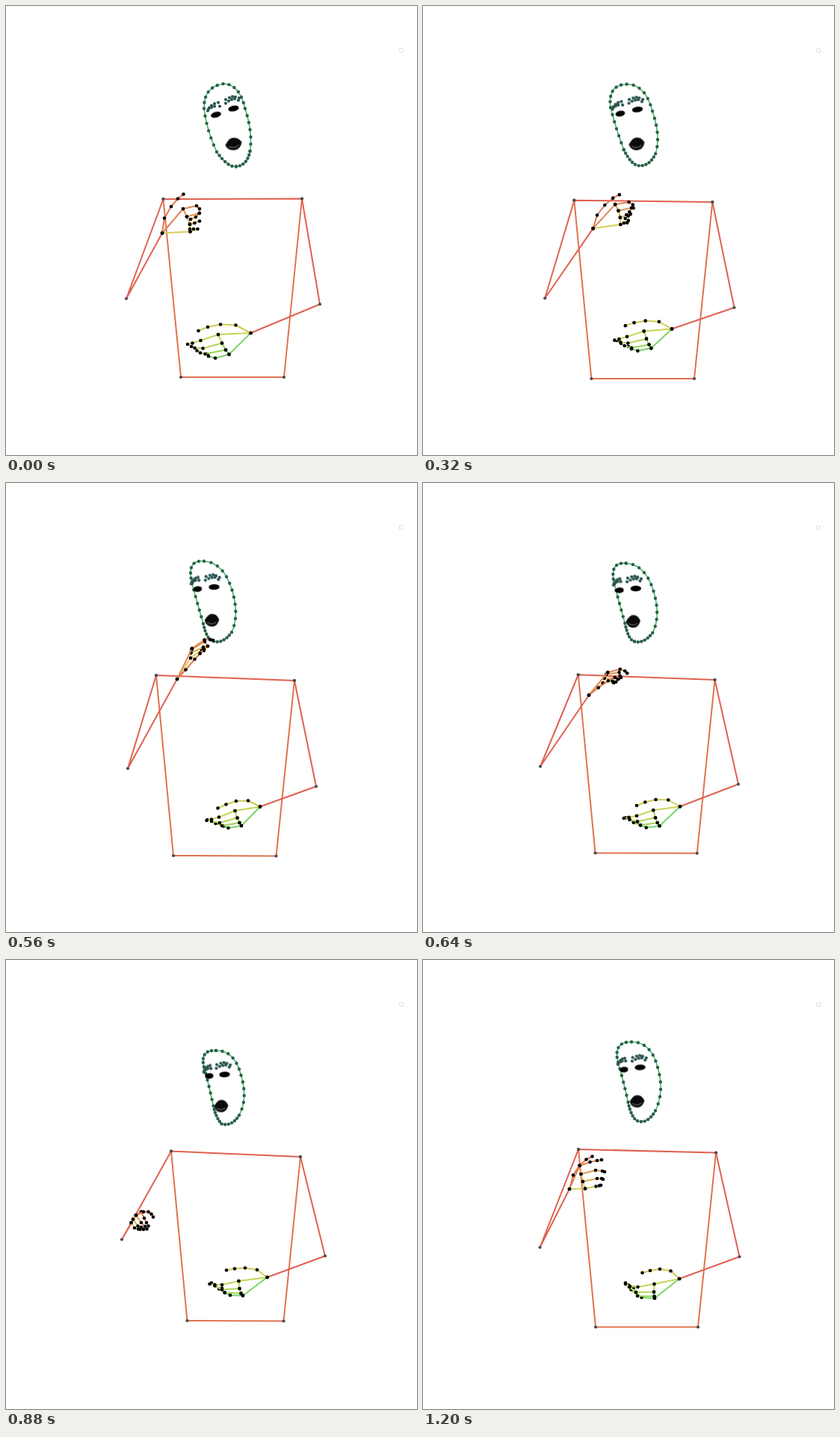
An HTML page without scripts that plays this animation: 550x600 px, repeating every 1.28 s.

```html
<!DOCTYPE html>
<html lang="en">
<head>
<meta charset="utf-8">
<title>Pose skeleton</title>
<style>
html,body{margin:0;width:100%;height:100%;overflow:hidden;background:#fff}
svg{display:block;width:550px;height:600px}
path,ellipse,.part{animation:1.28s steps(2) infinite}
.part *{animation:none}
path{fill:none;stroke-width:2;stroke-linejoin:round}
.body path{marker:url(#joint)}
.hand path{marker:url(#tip)}
.oval path{stroke:#46b968;stroke-width:1.6}
.dots path{stroke:#2c5f48;stroke-width:4.4;stroke-linecap:round;stroke-dasharray:0 1}
.brow{stroke:#2b5450;stroke-width:4.2;stroke-linecap:round;vector-effect:non-scaling-stroke}

/* Body */
@keyframes arms{
12.5%{d:path("M225 312.5 161.5 394.5 205 261 389 260 418.5 400 333 438.5");animation-timing-function:steps(3)}
31.25%{d:path("M229 289.5 164 388.5 201 259 386.5 263 415.5 404.5 333 428")}
43.75%{d:path("M229 262 163 381.5 201 257 386 264 415 405.5 340 432.5")}
56.25%{d:path("M215 305 151 376 214.5 255.5 395 262 429 399.5 348 432")}
68.75%{d:path("M174 341 155 373.5 221 255.5 394 263 427 395.5 349.5 424");animation-timing-function:steps(4)}
93.75%,99.99%{d:path("M196 306 156.5 384 208 253 392 257.5 423.5 396.5 343 426")}}
@keyframes torso{
12.5%{d:path("M205 261 228 496 365 496 389 260");animation-timing-function:steps(3)}
31.25%{d:path("M201 259 224 499 362 499 386.5 263")}
43.75%{d:path("M201 257 224 498 361.5 498.5 386 264")}
56.25%{d:path("M214.5 255.5 237 491 372 491 395 262")}
68.75%{d:path("M221 255.5 242.5 482 371.5 482.5 394 263");animation-timing-function:steps(4)}
93.75%,99.99%{d:path("M208 253 231 490.5 368 490.5 392 257.5")}}

/* Raised hand */
@keyframes thumb-a{
12.5%{d:path("M225 312.5 230 291.5 241 276 252.5 266 261.5 260.5");animation-timing-function:steps(3)}
31.25%{d:path("M229 289.5 234.5 273.5 244.5 261 255 252 263.5 248")}
43.75%{d:path("M229 262 240.5 249.5 252.5 235.5 259.5 228 265 222")}
56.25%{d:path("M215 305 229 297.5 243 293 254 291.5 262 293")}
68.75%{d:path("M174 341 184 336.5 190.5 336.5 194.5 339.5 197 343.5");animation-timing-function:steps(4)}
93.75%,99.99%{d:path("M196 306 201 287.5 209.5 274.5 218.5 266.5 226.5 262.5")}}
@keyframes index-a{
12.5%{d:path("M225 312.5 257.5 280.5 278.5 276 284.5 279 286 282");animation-timing-function:steps(3)}
31.25%{d:path("M229 289.5 257 257.5 274 255 279 259 279.5 264")}
43.75%{d:path("M229 262 249 221 265.5 209.5 273 209 277 210")}
56.25%{d:path("M215 305 245.5 285 262 288 267.5 293.5 269.5 298.5")}
68.75%{d:path("M174 341 181 336.5 185 345 188 351 190.5 355.5");animation-timing-function:steps(4)}
93.75%,99.99%{d:path("M196 306 209.5 275 223.5 270 233 268 239 267")}}
@keyframes middle-a{
12.5%{d:path("M257.5 280.5 262.5 291.5 281 287.5 277 291.5 270.5 295");animation-timing-function:steps(3)}
31.25%{d:path("M257 257.5 261 264.5 278 261 276 267 273 271")}
43.75%{d:path("M249 221 248.5 222.5 266 212 270 218 264 219.5")}
56.25%{d:path("M245.5 285 242 289 259 294 260 302 258 305")}
68.75%{d:path("M181 336.5 174 341 181 351 186 356 188.5 359.5");animation-timing-function:steps(4)}
93.75%,99.99%{d:path("M209.5 275 211.5 286 231 281 240 282 243 283")}}
@keyframes ring-a{
12.5%{d:path("M262.5 291.5 264.5 303 280 298.5 274 300 268 302");animation-timing-function:steps(3)}
31.25%{d:path("M261 264.5 263.5 272.5 276.5 268 275 271 272 275")}
43.75%{d:path("M248.5 222.5 247.5 227 264 219.5 270 218 265 224")}
56.25%{d:path("M242 289 238 294.5 253 301 253 306 251.5 307.5")}
68.75%{d:path("M174 341 170 346.5 176.5 355.5 181 357 184 360");animation-timing-function:steps(4)}
93.75%,99.99%{d:path("M211.5 286 214 296 233 292 239 292 241 293")}}
@keyframes pinky-a{
12.5%{d:path("M225 312.5 265 313 276.5 310 271.5 310 266.5 310M265 313 264.5 303");animation-timing-function:steps(3)}
31.25%{d:path("M229 289.5 264 281.5 274 275 274 279.5 270 280M264 281.5 263.5 272.5")}
43.75%{d:path("M229 262 247 234 262 223 264 224 260 227M247 234 247.5 227")}
56.25%{d:path("M215 305 234.5 301 245 306 245 308.5 251 307M234.5 301 238 294.5")}
68.75%{d:path("M174 341 167.5 351 172 358 177 359.5 179.5 360M167.5 351 170 346.5");animation-timing-function:steps(4)}
93.75%,99.99%{d:path("M196 306 217 305.5 231.5 302.5 236 301.5 238 301M217 305.5 214 296")}}

/* Resting hand */
@keyframes thumb-b{
12.5%{d:path("M333 438.5 315.5 427.5 297 426 281.5 428.5 269.5 432.5");animation-timing-function:steps(3)}
31.25%{d:path("M333 428 316 419 298 418 283 420.5 271.5 424.5")}
43.75%{d:path("M340 432.5 324 424.5 308 425 294.5 429.5 283.5 434.5")}
56.25%{d:path("M348 432 332.5 422.5 315 421 300 423.5 288.5 427.5")}
68.75%{d:path("M349.5 424 336 414 320 411.5 306 412.5 295 414.5");animation-timing-function:steps(4)}
93.75%,99.99%{d:path("M343 426 331.5 415.5 317 413 304 415 293.5 418")}}
@keyframes index-b{
12.5%{d:path("M333 438.5 294 440.5 271 447.5 260.5 450 254 451");animation-timing-function:steps(3)}
31.25%{d:path("M333 428 296.5 431.5 274 439 263.5 442.5 257.5 444.5")}
43.75%{d:path("M340 432.5 306.5 438 285 446.5 275 449.5 268.5 451")}
56.25%{d:path("M348 432 310 436.5 287 443 276 444 269 445")}
68.75%{d:path("M349.5 424 311.5 429 289 434 279.5 434 272.5 433");animation-timing-function:steps(4)}
93.75%,99.99%{d:path("M343 426 309.5 433 287.5 437 277 436 271 433")}}
@keyframes middle-b{
12.5%{d:path("M294 440.5 298 452 273 457.5 263 455 259 453");animation-timing-function:steps(3)}
31.25%{d:path("M296.5 431.5 299.5 441 275 447 265 446.5 260 444")}
43.75%{d:path("M306.5 438 309.5 447.5 286 454 275 452 269.5 450")}
56.25%{d:path("M310 436.5 312.5 447 288 450.5 278 447.5 273 444.5")}
68.75%{d:path("M311.5 429 312.5 439 289 440.5 279.5 435.5 275 431.5");animation-timing-function:steps(4)}
93.75%,99.99%{d:path("M309.5 433 309 443.5 285 444 276 437 271 431.5")}}
@keyframes ring-b{
12.5%{d:path("M298 452 301.5 460.5 278.5 464.5 269 461 265 457.5");animation-timing-function:steps(3)}
31.25%{d:path("M299.5 441 303 448.5 279.5 453 270 450.5 265 447.5")}
43.75%{d:path("M309.5 447.5 312.5 454 289 458 280.5 455 275 451.5")}
56.25%{d:path("M312.5 447 315 454 292.5 456.5 283 452.5 278 448")}
68.75%{d:path("M312.5 439 314.5 445.5 292.5 444.5 285 439.5 279 434");animation-timing-function:steps(4)}
93.75%,99.99%{d:path("M309 443.5 309.5 449.5 287 449 278.5 440.5 275 434.5")}}
@keyframes pinky-b{
12.5%{d:path("M333 438.5 305 466 287 469.5 279 466.5 274 462.5M305 466 301.5 460.5");animation-timing-function:steps(3)}
31.25%{d:path("M333 428 305.5 453 287.5 456.5 279 454 275 451M305.5 453 303 448.5")}
43.75%{d:path("M340 432.5 315 458 297.5 461 291 458.5 285 455M315 458 312.5 454")}
56.25%{d:path("M348 432 318 458.5 300 460 292 456 288 452M318 458.5 315 454")}
68.75%{d:path("M349.5 424 317 448.5 300 448 293 444.5 289 438.5M317 448.5 314.5 445.5");animation-timing-function:steps(4)}
93.75%,99.99%{d:path("M343 426 310 452 292.5 451 285 444.5 282 437.5M310 452 309.5 449.5")}}

/* Face outline, clockwise from the left temple */
@keyframes temple{
12.5%{d:path("M252 139Q250 108 276 105.5");animation-timing-function:steps(3)}
31.25%{d:path("M250.5 134Q245.5 104 271 104")}
43.75%{d:path("M249 134Q241 102 265 104.5")}
56.25%{d:path("M263 136Q256.5 108 278.5 110")}
68.75%{d:path("M265 143Q259 120 281 121");animation-timing-function:steps(4)}
93.75%,99.99%{d:path("M261 137Q254 109 279 109.5")}}
@keyframes crown{
12.5%{d:path("M276 105.5Q298.5 104.5 307 139.5");animation-timing-function:steps(3)}
31.25%{d:path("M271 104Q297 104.5 307 141")}
43.75%{d:path("M265 104.5Q291 106 302.5 143")}
56.25%{d:path("M278.5 110Q304.5 112 314.5 146")}
68.75%{d:path("M281 121Q306 120.5 314.5 154");animation-timing-function:steps(4)}
93.75%,99.99%{d:path("M279 109.5Q305.5 109.5 314 143.5")}}
@keyframes cheek{
12.5%{d:path("M307 139.5Q318.5 172 313.5 196");animation-timing-function:steps(3)}
31.25%{d:path("M307 141Q318.5 175.5 310 198")}
43.75%{d:path("M302.5 143Q312.5 177 302 199.5")}
56.25%{d:path("M314.5 146Q324.5 178.5 312.5 201")}
68.75%{d:path("M314.5 154Q324 185 312 207.5");animation-timing-function:steps(4)}
93.75%,99.99%{d:path("M314 143.5Q323.5 175.5 311 201.5")}}
@keyframes chin{
12.5%{d:path("M313.5 196Q308 212.5 293 215");animation-timing-function:steps(3)}
31.25%{d:path("M310 198Q301 215.5 286.5 212.5")}
43.75%{d:path("M302 199.5Q290 215.5 278 211.5")}
56.25%{d:path("M312.5 201Q300 215.5 288 212")}
68.75%{d:path("M312 207.5Q302 223 288.5 219");animation-timing-function:steps(4)}
93.75%,99.99%{d:path("M311 201.5Q300 220 287 215")}}
@keyframes jaw{
12.5%{d:path("M293 215Q281.5 216.5 270 196");animation-timing-function:steps(3)}
31.25%{d:path("M286.5 212.5Q278 211 268 190")}
43.75%{d:path("M278 211.5Q269 211 264 188")}
56.25%{d:path("M288 212Q281 209.5 276.5 187")}
68.75%{d:path("M288.5 219Q281 211 277.5 195");animation-timing-function:steps(4)}
93.75%,99.99%{d:path("M287 215Q279 211.5 274.5 190")}}
@keyframes side{
12.5%{d:path("M270 196Q257 168.5 252 139");animation-timing-function:steps(3)}
31.25%{d:path("M268 190Q259 163 250.5 134")}
43.75%{d:path("M264 188Q255.5 159 249 134")}
56.25%{d:path("M276.5 187Q270 162.5 263 136")}
68.75%{d:path("M277.5 195Q272 169 265 143");animation-timing-function:steps(4)}
93.75%,99.99%{d:path("M274.5 190Q268 160.5 261 137")}}

/* Features */
@keyframes eye-a{
0%,100%{transform:translate(281px,145.3px) rotate(-15deg) scale(1)}
12.5%{transform:translate(267px,146.5px) rotate(-15deg) scale(1);animation-timing-function:steps(3)}
31.25%{transform:translate(262.5px,142.5px) rotate(-10deg) scale(.88,1)}
43.75%{transform:translate(256.5px,141.7px) rotate(-5deg) scale(.84,1)}
56.25%{transform:translate(269.5px,145px) rotate(-3deg) scale(.82,1)}
68.75%{transform:translate(272px,155px) rotate(-5deg) scale(.82,1);animation-timing-function:steps(4)}
93.75%,99.99%{transform:translate(269px,146.5px) rotate(-5deg) scale(.82,1)}}
@keyframes eye-b{
0%,100%{transform:translate(304.5px,137px) rotate(-12deg)}
12.5%{transform:translate(290px,139px) rotate(-11deg);animation-timing-function:steps(3)}
31.25%{transform:translate(285.5px,138px) rotate(-6deg)}
43.75%{transform:translate(278.5px,139px) rotate(-2deg)}
56.25%{transform:translate(291px,143px) rotate(0deg)}
68.75%{transform:translate(292.5px,153px) rotate(-3deg);animation-timing-function:steps(4)}
93.75%,99.99%{transform:translate(290.5px,143.5px) rotate(-3deg)}}
@keyframes brow-a{
0%,100%{transform:translate(278px,134px) scale(1)}
12.5%{transform:translate(264px,135px) scale(.93,1);animation-timing-function:steps(3)}
31.25%{transform:translate(258.5px,131px) scale(.8,.9)}
43.75%{transform:translate(253px,130px) scale(.65,.8)}
56.25%{transform:translate(266.5px,133.5px) scale(.55,.75)}
68.75%{transform:translate(269.5px,145px) scale(.6,.8);animation-timing-function:steps(4)}
93.75%,99.99%{transform:translate(266px,135px) scale(.65,.75)}}
@keyframes brow-b{
0%,100%{transform:translate(303px,125px) rotate(0deg)}
12.5%{transform:translate(288px,126.5px) rotate(3deg);animation-timing-function:steps(3)}
31.25%{transform:translate(283.5px,125.5px) rotate(8deg)}
43.75%{transform:translate(276.5px,126.5px) rotate(10deg)}
56.25%{transform:translate(289px,130.5px) rotate(9deg)}
68.75%{transform:translate(291px,141px) rotate(8deg);animation-timing-function:steps(4)}
93.75%,99.99%{transform:translate(289.5px,131.5px) rotate(8deg)}}
@keyframes mouth{
0%,100%{transform:translate(304.5px,184px) rotate(-6deg) scale(1)}
12.5%{transform:translate(290px,184.5px) rotate(-6deg) scale(1);animation-timing-function:steps(3)}
31.25%{transform:translate(284px,183.5px) rotate(0deg) scale(.92,1.04)}
43.75%{transform:translate(275.5px,183px) rotate(4deg) scale(.87,1.04)}
56.25%{transform:translate(287px,186px) rotate(4deg) scale(.84,1.02)}
68.75%{transform:translate(288px,194.8px) rotate(3deg) scale(.84,1);animation-timing-function:steps(4)}
93.75%,99.99%{transform:translate(286.5px,188.5px) rotate(2deg) scale(.88,1)}}
</style>
</head>
<body>
<svg viewBox="0 0 550 600">
<defs>
<marker id="joint" markerUnits="userSpaceOnUse" overflow="visible"><circle r="2.1" fill="#4c4c4c"/></marker>
<marker id="tip" markerUnits="userSpaceOnUse" overflow="visible"><circle r="2.3"/></marker>
</defs>
<rect x="526.5" y="57" width="5" height="5" rx="1" fill="#fff" stroke="#ddd"/>

<g class="body">
<path style="animation-name:torso" stroke="#e0724f" d="M210.5 258 234 496 372 496 396 257.5"/>
<path style="animation-name:arms" stroke="#df6251" d="M209 303.5 161 391 210.5 258 396 257.5 420 398.5 327.5 437"/>
</g>

<g class="oval">
<path style="animation-name:temple" d="M265 137Q264.5 108 290.5 104"/>
<path style="animation-name:crown" d="M290.5 104Q312 103.5 320 137"/>
<path style="animation-name:cheek" d="M320 137Q330.5 170.5 326.5 194"/>
<path style="animation-name:chin" d="M326.5 194Q323 213 308 214.5"/>
<path style="animation-name:jaw" d="M308 214.5Q297 216 282 195"/>
<path style="animation-name:side" d="M282 195Q268.5 166 265 137"/>
</g>
<g class="dots">
<path style="animation-name:temple" pathLength="6" d="M265 137Q264.5 108 290.5 104"/>
<path style="animation-name:crown" pathLength="6" d="M290.5 104Q312 103.5 320 137"/>
<path style="animation-name:cheek" pathLength="6" d="M320 137Q330.5 170.5 326.5 194"/>
<path style="animation-name:chin" pathLength="6" d="M326.5 194Q323 213 308 214.5"/>
<path style="animation-name:jaw" pathLength="6" d="M308 214.5Q297 216 282 195"/>
<path style="animation-name:side" pathLength="6" d="M282 195Q268.5 166 265 137"/>
</g>

<path class="brow" style="animation-name:brow-a" d="M-8 6h0M-6 2h0M-3-1h0M1-3.5h0M6-5h0M-7 4h0M-3 1.5h0M1 0h0M8 0h0"/>
<path class="brow" style="animation-name:brow-b" d="M-9 0h0M-4-2.5h0M0-4h0M4-3.5h0M9-2h0M-9 5h0M-5 2h0M-1 0h0M3-1h0M8 1h0"/>
<ellipse style="animation-name:eye-a" rx="7" ry="3.8"/>
<ellipse style="animation-name:eye-b" rx="7.2" ry="3.8"/>
<g class="part" style="animation-name:mouth">
<path style="fill:#0a0a0a;stroke:#1c1c1c;stroke-width:1.4" d="M-10.5 1C-8-3-4-8 0-7 5-8 8-5 10.5-1 9 5 5 8 0 8-5 8-9 5-10.5 1Z"/>
<path style="stroke:#999;stroke-width:.8" d="M-7 3.5Q0 7 7 2.5"/>
</g>

<g class="hand">
<path style="animation-name:pinky-a" stroke="#d8cd5c" d="M209 303.5 246.5 301.5 256.5 298 251 298 246 298M246.5 301.5 246 291.5"/>
<path style="animation-name:ring-a" stroke="#dcb055" d="M242 281.5 246 291.5 259 287.5 252.5 290 246 292"/>
<path style="animation-name:middle-a" stroke="#df9852" d="M237 271 242 281.5 258.5 277 254 282 247 285"/>
<path style="animation-name:index-a" stroke="#e08455" d="M209 303.5 237 271 255 267 259 271 259 277"/>
<path style="animation-name:thumb-a" stroke="#e17850" d="M209 303.5 212 283.5 221 268 230 257.5 237.5 251.5"/>
</g>
<g class="hand">
<path style="animation-name:pinky-b" stroke="#78d665" d="M327.5 437 298.5 465.5 280 470.5 271 468 270 465M298.5 465.5 294 459.5"/>
<path style="animation-name:ring-b" stroke="#9bd655" d="M289 450.5 294 459.5 266.5 465 260 463.5 255.5 460.5"/>
<path style="animation-name:middle-b" stroke="#b5d653" d="M284 439 289 450.5 263.5 457.5 252.5 457 248 455"/>
<path style="animation-name:index-b" stroke="#cad455" d="M327.5 437 284 439 260.5 447 249.5 450.5 243 452"/>
<path style="animation-name:thumb-b" stroke="#cfcb52" d="M327.5 437 307.5 426.5 287 425.5 270 429 257.5 434"/>
</g>
</svg>
</body>
</html>
```
